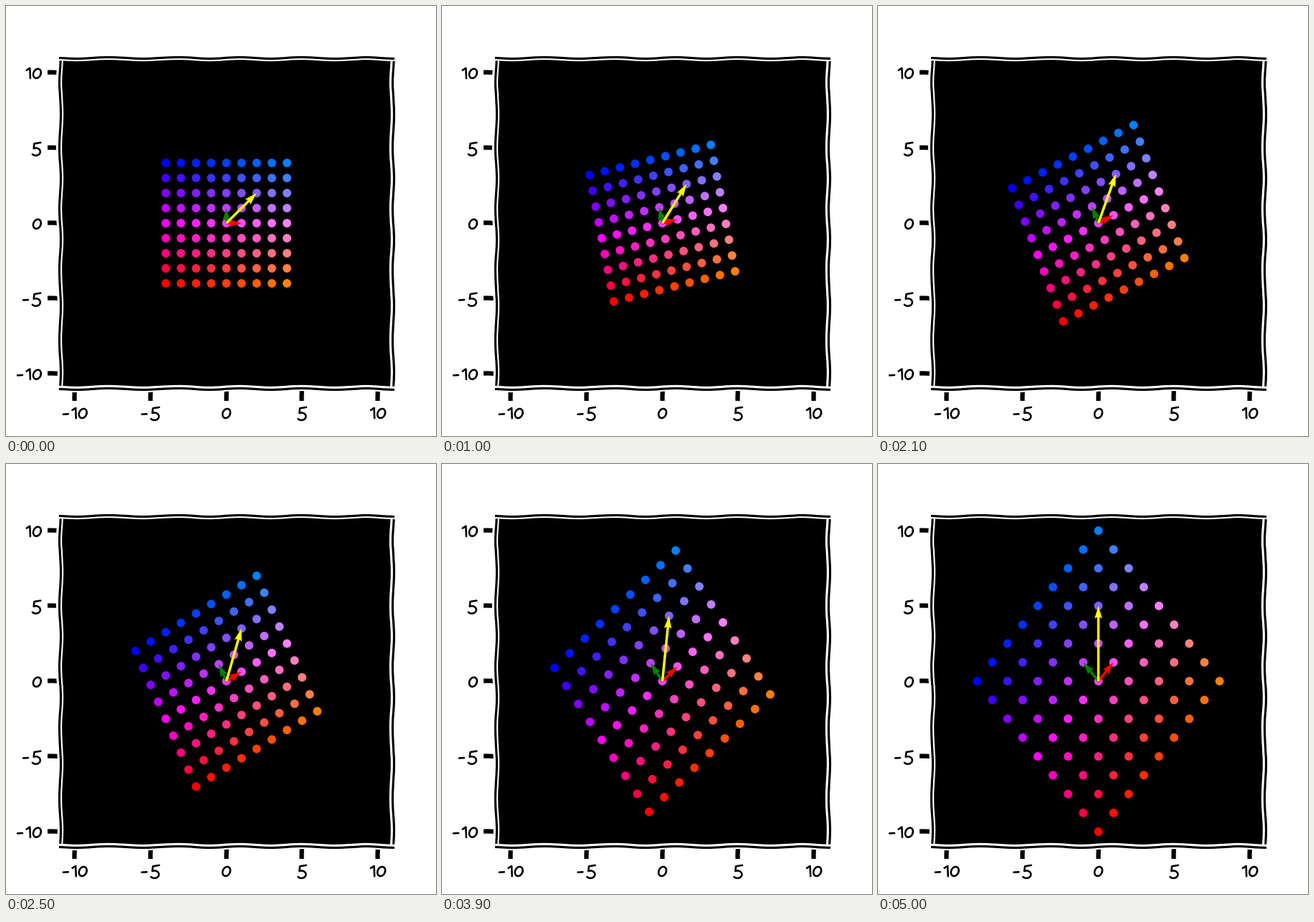
A matplotlib script for the animation above (5100 ms loop, 600 by 600 pixels).

```python
import numpy as np
import matplotlib.pyplot as plt
from matplotlib.animation import FuncAnimation
from matplotlib.lines import Line2D
from matplotlib.transforms import IdentityTransform

SIZE, DPI = 600, 150
STEPS = 50
START, END = np.eye(2), np.array([[1, -1], [1.25, 1.25]])
TICKS = range(-10, 11, 5)

plt.xkcd()
plt.rcParams["font.family"] = "DejaVu Sans"


def plain(artist):
    """Turn off the hand-drawn wobble and white halo."""
    artist.set_path_effects([])
    artist.set_sketch_params(None)
    return artist


def arc(cx, cy, rx, ry, start=0, end=360, slant=0):
    t = np.radians(np.linspace(start, end, 40))
    return np.column_stack([cx + rx * np.cos(t) + slant * ry * np.sin(t),
                            cy + ry * np.sin(t)])


# Handwritten strokes in pixels above the baseline, with advance widths
STROKES = {
    "-": [(1.2, 5.8), (8.2, 6.2)],
    "0": arc(6.6, 7, 5.3, 6.5, slant=0.18),
    "1": [(1.4, 11.6), (6, 14.6), (6.6, 0.2)],
    "5": np.vstack([[(13, 15.6), (4.2, 14.2), (3.4, 7.4)],
                    arc(6.3, 2.8, 6.2, 5.2, 110, -140)]),
}
ADVANCE = {"-": 12.5, "0": 14, "1": 9.5, "5": 15.5}


def width(text):
    return sum(ADVANCE[char] for char in text)


def write(text, x, y):
    for char in text:
        xs, ys = np.transpose(STROKES[char])
        stroke = Line2D(xs + x, ys + y, color="black",
                        linewidth=2.6 * 72 / DPI,
                        solid_capstyle="round", solid_joinstyle="round",
                        transform=IdentityTransform())
        fig.add_artist(plain(stroke))
        x += ADVANCE[char]


fig, ax = plt.subplots(figsize=(SIZE / DPI, SIZE / DPI), dpi=DPI)
ax.set_facecolor("black")
ax.set(xlim=(-11, 11), ylim=(-11, 11))
ax.set_xticks(TICKS, [""] * len(TICKS))
ax.set_yticks(TICKS, [""] * len(TICKS))

for tick in TICKS:
    px, py = ax.transData.transform((tick, tick))
    label = str(tick)
    write(label, px - width(label) / 2 + 0.5, 24.5)
    write(label, 50.8 - width(label), py - 8.2)

axis = np.arange(-4, 5)
grid = np.array(np.meshgrid(axis, axis)).reshape(2, -1)
x, y = grid
colors = np.column_stack([np.minimum(1, 1 - y / 4), (x + 4) / 16,
                          np.minimum(1, 1 + y / 4)])
vectors = np.column_stack([np.eye(2), (2, 2)])

dots = plain(ax.scatter(x, y, s=32.5, c=colors, linewidths=0))
arrows = plain(ax.quiver([0] * 3, [0] * 3, *vectors,
                         color=["red", "green", "yellow"],
                         angles="xy", scale_units="xy", scale=1))


def update(i):
    matrix = START + (END - START) * i / STEPS
    dots.set_offsets((matrix @ grid).T)
    arrows.set_UVC(*(matrix @ vectors))
    return dots, arrows


anim = FuncAnimation(fig, update, frames=STEPS + 1, interval=100,
                     repeat=True, repeat_delay=0, blit=False)
plt.show()
```
